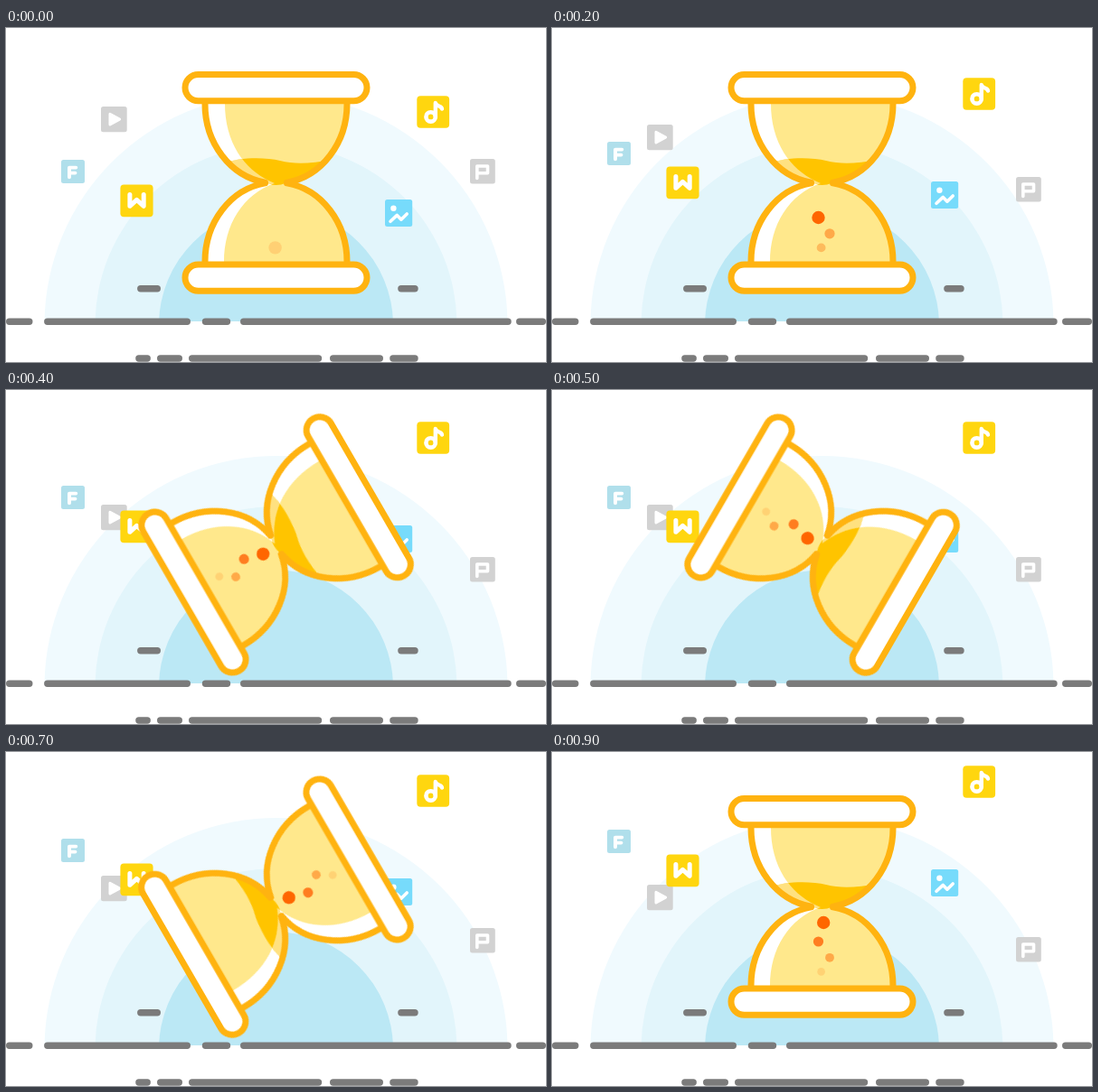
Recreate the animation shown at these times as an HTML page. Size 597x370 px, loop 1000 ms.

```html
<!DOCTYPE html>
<html lang="en">
<head>
<meta charset="utf-8">
<title>Hourglass loader</title>
<style>
  html, body { margin: 0; width: 100%; height: 100%; overflow: hidden; background: #fff; }
  svg { display: block; width: 100%; height: 100%; }

  .icon, .glass, .grain { animation: 1s step-end infinite; }
  .icon { --step: -10px; animation-name: drift; }
  .down { --step: 10px; }
  .glass { transform-origin: 298.5px 171.5px; animation-name: flip; }
  .mark { fill: none; stroke: #fff; stroke-linecap: round; stroke-linejoin: round; }
  .ground { fill: none; stroke: #7b7b7b; stroke-width: 7.4; stroke-linecap: round; }
  .rim { fill: none; stroke: #ffb310; stroke-width: 7; stroke-linejoin: round; }
  .cap { fill: #fff; stroke: #ffb310; stroke-width: 7; }

  .g1 { animation-name: grain1; }
  .g2 { animation-name: grain2; }
  .g3 { animation-name: grain3; }
  .g4 { animation-name: grain4; }

  @keyframes drift {
    0%  { transform: translateY(0); }
    10% { transform: translateY(var(--step)); }
    20% { transform: translateY(calc(2 * var(--step))); }
    30% { transform: translateY(calc(3 * var(--step))); }
    40% { transform: translateY(calc(4 * var(--step))); }
    60% { transform: translateY(calc(5 * var(--step))); }
    80%, 100% { transform: translateY(calc(6 * var(--step))); }
  }
  @keyframes flip {
    0%, 30% { transform: rotate(0deg); }
    40% { transform: rotate(60deg); }
    50% { transform: rotate(120deg); }
    60% { transform: rotate(180deg); }
    70% { transform: rotate(240deg); }
    80% { transform: rotate(300deg); }
    90%, 100% { transform: rotate(360deg); }
  }
  /* grains appear from the bottom up and shrink as newer ones follow */
  @keyframes grain1 {
    0% { r: 0; }
    30%, 100% { r: 7.2px; }
  }
  @keyframes grain2 {
    0% { r: 0; fill: #ff6600; }
    20% { r: 7.2px; fill: #ff6600; }
    30%, 100% { r: 5.6px; fill: #ff7d20; }
  }
  @keyframes grain3 {
    0% { r: 0; fill: #ff9b3c; }
    10% { r: 7.2px; fill: #ff9b3c; }
    20% { r: 5.6px; fill: #ffa948; }
    30%, 100% { r: 4.9px; fill: #ffa948; }
  }
  @keyframes grain4 {
    0% { r: 7.2px; fill: #ffd074; }
    10% { r: 5.6px; fill: #ffc467; }
    20% { r: 4.9px; fill: #fdbb5c; }
    30%, 100% { r: 4.3px; fill: #ffd274; }
  }
</style>
</head>
<body>
<svg viewBox="0 0 597 370" preserveAspectRatio="none">
  <defs>
    <clipPath id="sky"><path d="M0 0H597V325H0Z"/></clipPath>
    <path id="body" d="M220 84A78.5 88 0 0 0 286.5 171.1V171.9A78.5 88 0 0 0 220 259H377A78.5 88 0 0 0 310.5 171.9V171.1A78.5 88 0 0 0 377 84Z"/>
    <path id="sand" d="M240 150C258 143 286 143 303 147C320 151.5 338 150 360 146L350 168L310 171.5Q299 176 291 172.5L240 172Z"/>
    <clipPath id="inBody"><use href="#body"/></clipPath>
    <clipPath id="inSand"><use href="#sand"/></clipPath>
    <path id="shine" d="M215 84H242C242 125 262 158 297 172C262 184 241 218 241 259H215Z"/>
  </defs>

  <g clip-path="url(#sky)">
    <circle cx="298.5" cy="329" r="256" fill="#f0fafe"/>
    <circle cx="298.5" cy="329" r="200" fill="#e2f5fb"/>
    <circle cx="298.5" cy="329" r="129.5" fill="#bbe8f5"/>
  </g>

  <path class="ground" d="M3.7 325.3H25.8M45.8 325.3H200.3M220.5 325.3H244.5M262.7 325.3H555M567.7 325.3H593.3
    M146.9 366H156.2M170.7 366H191.3M205.7 366H345.5M361.7 366H413.3M427.9 366H452
    M148.8 288.7H167.3M436.9 288.7H452"/>

  <g class="icon down">
    <rect x="105" y="87" width="28.7" height="28.3" rx="2.5" fill="#d2d2d2"/>
    <path class="mark" d="M115 95.2V107L125.6 101.1Z" style="fill:#fff" stroke-width="3"/>
  </g>
  <g class="icon down">
    <rect x="513" y="145" width="27.8" height="27.5" rx="2.5" fill="#d2d2d2"/>
    <path class="mark" d="M520.8 166.5V153H532.5V160.8H521.5" stroke-width="3.6"/>
  </g>
  <g class="icon">
    <rect x="61" y="146" width="26" height="26" rx="2.5" fill="#b0dfeb"/>
    <path class="mark" d="M70 165.3V154.6H77.3M70 160.6H76.5" stroke-width="3.9"/>
  </g>
  <g class="icon">
    <rect x="126.4" y="173.4" width="36.2" height="35.8" rx="4" fill="#ffd60f"/>
    <path class="mark" d="M136.9 184.5V197.3L144.5 190.3L152.2 197.3V184.5" stroke-width="5"/>
  </g>
  <g class="icon">
    <rect x="419" y="190" width="30.2" height="30" rx="2.5" fill="#77dbfb"/>
    <circle cx="428.4" cy="199.7" r="3.2" fill="#fff"/>
    <path class="mark" d="M425 214.3L432.3 207.4L436.9 212.2L443.2 206" stroke-width="3.6"/>
  </g>
  <g class="icon">
    <rect x="454.3" y="75.2" width="35.8" height="35.6" rx="4" fill="#ffd60f"/>
    <circle class="mark" cx="469.6" cy="98.4" r="5.2" stroke-width="4.6"/>
    <path class="mark" d="M474.8 98V83C476 87.5 481 85.5 482 89.5" stroke-width="4.4"/>
  </g>

  <g class="glass">
    <g clip-path="url(#inBody)">
      <use href="#body" fill="#ffe88c"/>
      <use href="#shine" fill="#fff"/>
      <use href="#sand" fill="#ffc400"/>
      <g clip-path="url(#inSand)"><use href="#shine" fill="#fff" fill-opacity=".5"/></g>
    </g>
    <circle class="grain g4" cx="297.6" cy="243.4" fill="#ffd274"/>
    <circle class="grain g3" cx="307" cy="227.8" fill="#ffa948"/>
    <circle class="grain g2" cx="294.5" cy="210" fill="#ff7d20"/>
    <circle class="grain g1" cx="300.2" cy="189" fill="#ff6600"/>
    <path class="rim" stroke-linecap="round" d="M220 84A78.5 88 0 0 0 286.5 171.1V171.9A78.5 88 0 0 0 220 259M377 84A78.5 88 0 0 1 310.5 171.1V171.9A78.5 88 0 0 1 377 259"/>
    <rect class="cap" x="198" y="51.5" width="201" height="29.2" rx="14.6"/>
    <rect class="cap" x="198" y="262" width="201" height="29.2" rx="14.6"/>
  </g>
</svg>
</body>
</html>
```
